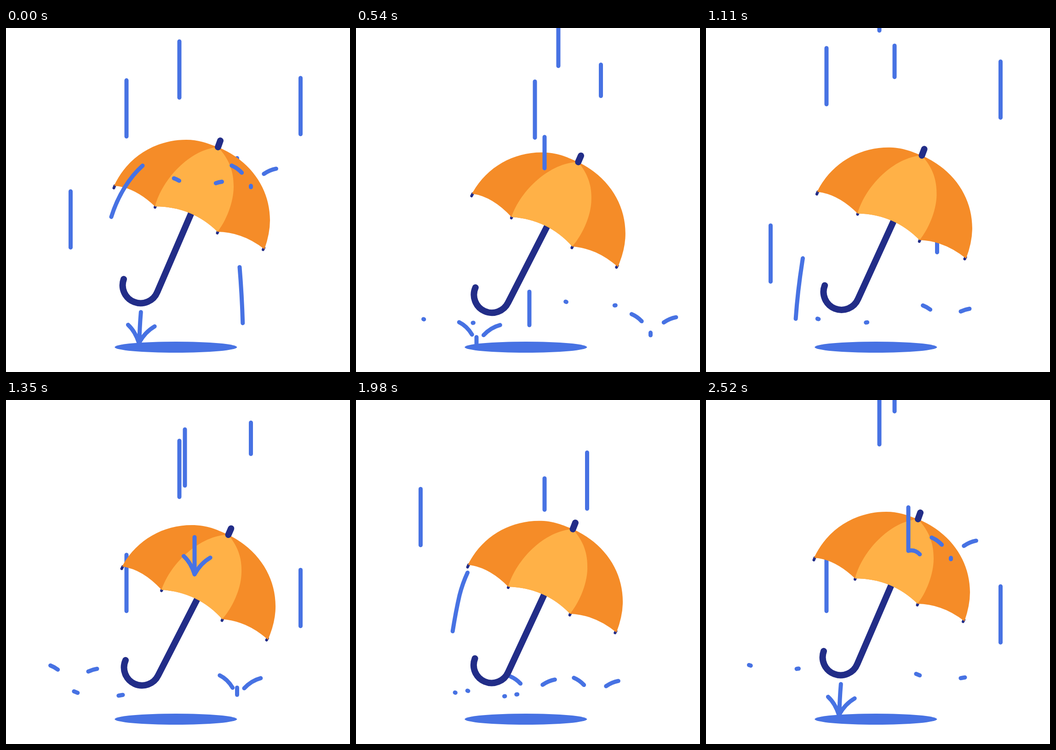
An HTML page without scripts for the animation above (2.55 s loop, 748 by 748 pixels).

```html
<!DOCTYPE html>
<html lang="en">
<head>
<meta charset="utf-8">
<title>Umbrella in the rain</title>
<style>
  /* --t counts 30 ms ticks; every part derives its own cycle from it */
  @property --t { syntax: "<number>"; inherits: true; initial-value: 0; }
  @keyframes tick { from { --t: 0; } to { --t: 85; } }

  html, body { margin: 0; height: 100%; overflow: hidden; background: #fff; }
  svg {
    display: block; width: 100%; height: 100%;
    fill: none; stroke-linecap: round; stroke-linejoin: round;
    animation: tick 2550ms steps(85) -4ms infinite;
  }

  /* --p period, --m tick of top speed, --c/--r centre and reach of the fall,
     --h tick of the hit, --l length of the streak */
  .drop {
    --l: 122;
    --n: mod(var(--t) - var(--m) + var(--p) / 2, var(--p));
    --head: (var(--c) + var(--r) * sin(180deg * (var(--n) / var(--p) - .5)));
    --u: mod(var(--t) - var(--h), var(--p));
    stroke: #4772e3; stroke-width: 9;
  }
  .short { --l: 68; }
  .fall {
    stroke-dasharray: calc(var(--l) * 1px) 2000px;
    stroke-dashoffset: calc((var(--l) - 195.5 - var(--head)) * 1px);
  }
  .curl {
    --lead: exp(-.5 * var(--u));
    --trail: exp(-.4 * max(var(--u) - 3, 0));
    stroke-dasharray: calc((var(--trail) - var(--lead)) * 100px) 300px;
    stroke-dashoffset: calc((var(--trail) - 1) * 100px);
    opacity: calc(9 * min(var(--u), 14 - var(--u)));
  }

  .umbrella {
    --k: calc(mod(var(--t), 28) / 28);
    --sink: pow(sin(180deg * pow(var(--k), 1.1)), 2);
    --tilt: pow(sin(180deg * pow(var(--k), 1.45)), 2);
    transform-origin: 291px 562px;
    transform:
      translate(calc(3px * var(--sink)), calc(23.5px * var(--sink)))
      rotate(calc(3.8deg * var(--tilt)));
  }
  .navy { stroke: #222d88; stroke-width: 14; }
  .rib { stroke: #222d88; stroke-width: 6; }
</style>
</head>
<body>
<svg viewBox="0 0 748 748">
  <defs>
    <g id="splash">
      <path class="curl" pathLength="100" d="M0 0C-8 -25 -22 -45 -47 -53"/>
      <path class="curl" pathLength="100" d="M0 0C10 -18 30 -42 62 -45"/>
    </g>
  </defs>

  <ellipse cx="369.3" cy="694" rx="133" ry="12" fill="#4772e3"/>

  <!-- rain behind the umbrella -->
  <g class="drop" style="--p:35;--m:-4;--c:320;--r:460;--h:4">
    <path class="fall" d="M140.5 -200V626"/><use href="#splash" x="140" y="629"/>
  </g>
  <g class="drop" style="--p:39;--m:3.5;--c:370;--r:466;--h:14">
    <path class="fall" d="M262 -200V686"/><use href="#splash" x="262" y="689"/>
  </g>
  <g class="drop" style="--p:43;--m:7;--c:376;--r:450;--h:18">
    <path class="fall" d="M377 -200V646"/><use href="#splash" x="377" y="652"/>
  </g>
  <g class="drop" style="--p:35;--m:-1.5;--c:346;--r:473;--h:6">
    <path class="fall" d="M502.5 -200V641"/><use href="#splash" x="502.5" y="648"/>
  </g>
  <g class="drop" style="--p:38;--m:3.4;--c:362;--r:457;--h:13">
    <path class="fall" d="M640.5 -200V668"/><use href="#splash" x="640.5" y="673"/>
  </g>

  <g class="umbrella">
    <path class="navy" d="M404 400L329 574A39.1 39.1 0 0 1 256 546"/>
    <path class="rib" d="M236.500 343l-2 5M325 387l-1 3M461 442l-1.500 4M561 478l-2 4"/>
    <path fill="#f58c28" d="M235 343C264 280 325 243 392 243C424 243 445 254 461 259C535 290 574 352 574 418Q574 447 562 481Q515 444 460 443Q404 388 324 388Q280 346 235 343"/>
    <path fill="#ffb147" d="M324 388C340 328 400 264 461 259C485 285 495 310 495 345C495 380 478 420 460 443Q404 388 324 388"/>
    <path class="navy" d="M466 245L461 259"/>
  </g>

  <!-- rain that lands on the umbrella -->
  <g class="drop short" style="--p:28;--m:19;--c:183;--r:275;--h:23">
    <path class="fall" d="M532.5 -200V346"/><use href="#splash" x="532" y="350"/>
  </g>
  <g class="drop short" style="--p:25;--m:15.5;--c:226;--r:270;--h:18">
    <path class="fall" d="M410 -200V377"/><use href="#splash" x="410" y="379"/>
  </g>
  <g class="drop" style="--p:28;--m:21;--c:410;--r:506;--h:26">
    <path class="fall" d="M389 -200V318C345 322 292 520 290 684"/><use href="#splash" x="289" y="685"/>
  </g>
  <g class="drop" style="--p:30;--m:26;--c:466;--r:510;--h:1">
    <path class="fall" d="M440 -200V328C475 318 490 385 499 440S514 600 515 652"/><use href="#splash" x="515" y="655"/>
  </g>
  <g class="drop" style="--l:132;--p:32;--m:31;--c:418;--r:490;--h:5">
    <path class="fall" d="M345.5 -200V274C300 280 245 345 225 425C210 490 194 600 193 682"/><use href="#splash" x="193.5" y="686"/>
  </g>
</svg>
</body>
</html>
```
